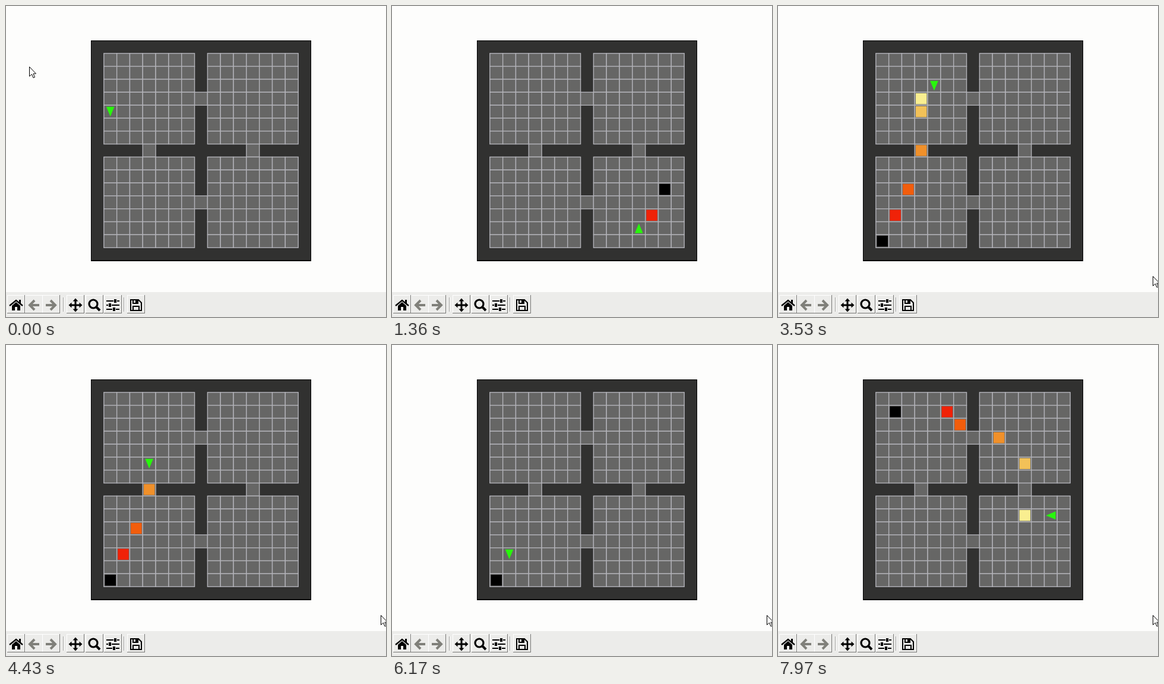
Write an HTML page with a canvas that moves like this. It is 640x524 px and loops after 8000 ms.

```html
<!DOCTYPE html>
<html lang="en">
<head>
<meta charset="utf-8">
<title>Four rooms</title>
<style>
  html, body { margin: 0; width: 100%; height: 100%; overflow: hidden; background: #fdfdfc; }
  canvas { display: block; }
</style>
</head>
<body>
<canvas id="stage" width="640" height="524"></canvas>
<script>
const ctx = document.getElementById('stage').getContext('2d');
const LOOP = 8000;
const TICK = 135, FIRST_TICK = 8;
const PLAN_TICKS = 2, START_TICKS = 5, DOOR_WAIT = 2;
const LEFT = 143, TOP = 58, BOARD = 371, ROOMS = 17, CELL = BOARD / ROOMS;
const PAPER = '#fdfdfc', FACE = '#ececea', INK = '#000';
const SUBGOAL_COLORS = ['#f9ee90', '#f2c158', '#f0902a', '#f25d0c', '#f02208'];

// Headings: 0 east, 1 south, 2 west, 3 north. The last goal is the final one.
const EPISODES = [
  { tick: 0, pose: [1, 5, 1], goals: [] },
  { tick: 1, pose: [9, 15, 0], goals: [[12, 14], [13, 13], [14, 11]] },
  { tick: 18, pose: [5, 1, 3], goals: [[4, 4], [4, 5], [4, 8], [3, 11], [2, 13], [1, 15]] },
  { tick: 52, pose: [15, 10, 1], goals: [[12, 10], [12, 6], [10, 4], [7, 3], [6, 2], [2, 2]] }
];

const onWall = n => n % 8 === 0;
const isDoor = (c, r) => onWall(c) !== onWall(r) && (onWall(c) ? r : c) % 8 === 4 &&
  (onWall(c) ? c : r) === 8;
const isFloor = (c, r) => !onWall(c) && !onWall(r) || isDoor(c, r);

function rect(x, y, w, h, color) {
  ctx.fillStyle = color;
  ctx.fillRect(x, y, w, h);
}

function trace(points) {
  ctx.beginPath();
  points.forEach(([x, y]) => ctx.lineTo(x, y));
}

function polygon(points, fill) {
  trace(points);
  ctx.closePath();
  ctx.fillStyle = fill;
  ctx.fill();
}

function stroke(color, width) {
  ctx.strokeStyle = color;
  ctx.lineWidth = width;
  ctx.stroke();
}

function line(points, color, width) {
  trace(points);
  stroke(color, width);
}

function at(x, y, angle, draw) {
  ctx.save();
  ctx.translate(x, y);
  ctx.rotate(angle);
  draw();
  ctx.restore();
}

function drawRooms() {
  rect(LEFT, TOP, BOARD, BOARD + 1, INK);
  rect(LEFT + 1, TOP + 1, BOARD - 2, BOARD - 2, '#313130');
  ctx.strokeStyle = '#b2b2b8';
  ctx.lineWidth = 1.4;
  for (let r = 0; r < ROOMS; r++) {
    for (let c = 0; c < ROOMS; c++) {
      if (!isFloor(c, r)) continue;
      const x = LEFT + c * CELL, y = TOP + r * CELL;
      rect(x, y, CELL, CELL, '#666665');
      ctx.strokeRect(x, y, CELL, CELL);
    }
  }
}

function homeIcon() {
  line([[-11, 1], [0, -8], [11, 1]], INK, 2.4);
  rect(5, -9, 3, 6, INK);
  polygon([[-7, 1], [0, -5], [7, 1], [7, 9], [-7, 9]], INK);
  rect(-2, 3, 4, 6, FACE);
}

function arrowIcon() {
  line([[1, -8], [-7, 0], [1, 8]], '#80807a', 4);
  line([[-6, 0], [9, 0]], '#80807a', 4);
}

function panIcon() {
  for (let i = 0; i < 4; i++) {
    at(0, 0, i * Math.PI / 2, () => {
      rect(0, -1.5, 8, 3, INK);
      polygon([[6.5, -4.5], [11.5, 0], [6.5, 4.5]], INK);
    });
  }
}

function zoomIcon() {
  ctx.beginPath();
  ctx.arc(-2, -2, 7, 0, Math.PI * 2);
  stroke(INK, 3.2);
  line([[3, 3], [9, 9]], INK, 4);
}

function slidersIcon() {
  [2, -7, 0].forEach((knob, i) => {
    const y = (i - 1) * 7;
    rect(-11, y - 1, 22, 2, INK);
    rect(knob - 1, y - 3, 6, 6, FACE);
    rect(knob, y - 3, 4, 6, INK);
  });
}

function saveIcon() {
  line([[-9, -9], [4, -9], [9, -4], [9, 9], [-9, 9], [-9, -10]], INK, 2);
  ctx.strokeRect(-5, 2, 10, 7);
  ctx.strokeRect(-5, -9, 8, 6);
  rect(-1, -8, 3, 4, INK);
}

function button(x, icon, angle = 0) {
  rect(x - 15, 487, 30, 31, '#777775');
  rect(x - 15, 487, 29, 30, '#fff');
  rect(x - 14, 488, 28, 29, FACE);
  at(x, 504, angle, icon);
}

function drawToolbar() {
  rect(0, 482, 640, 42, FACE);
  button(17, homeIcon);
  button(47, arrowIcon);
  button(76, arrowIcon, Math.PI);
  button(117, panIcon);
  button(149, zoomIcon);
  button(180, slidersIcon);
  button(219, saveIcon);
  for (const x of [97, 199]) {
    rect(x - 1, 491, 1, 24, '#a0a09e');
    rect(x, 491, 1, 24, '#fff');
  }
}

function drawGoal([c, r], color) {
  rect(LEFT + c * CELL + 1.7, TOP + r * CELL + 1.7, CELL - 3.4, CELL - 3.4, color);
}

function drawAgent({ c, r, heading }) {
  at(LEFT + (c + .5) * CELL, TOP + (r + .5) * CELL, heading * Math.PI / 2, () =>
    polygon([[-8.2, -6.8], [8.2, 0], [-8.2, 6.8]], '#28f60c'));
}

// Keep going while it brings the goal nearer, else turn: rows first, then columns.
function chooseHeading(heading, dx, dy) {
  const gain = [dx, dy, -dx, -dy];
  if (gain[heading] > 0) return heading;
  if (dy) return dy > 0 ? 1 : 3;
  return dx < 0 ? 2 : 0;
}

function step(agent, goals) {
  if (isDoor(agent.c, agent.r) && agent.waited < DOOR_WAIT) {
    agent.waited++;
    return;
  }
  const [goalC, goalR] = goals[agent.reached];
  const dx = goalC - agent.c, dy = goalR - agent.r;
  const wanted = chooseHeading(agent.heading, dx, dy);
  if (wanted !== agent.heading) {
    const quarterTurns = (wanted - agent.heading + 4) % 4;
    agent.heading = (agent.heading + (quarterTurns === 3 ? 3 : 1)) % 4;
  } else if (dx || dy) {
    agent.c += [1, 0, -1, 0][wanted];
    agent.r += [0, 1, 0, -1][wanted];
    const arrived = agent.c === goalC && agent.r === goalR;
    if (arrived && agent.reached < goals.length - 1) agent.reached++;
    agent.waited = 0;
  }
}

function drawEpisode(t) {
  const tick = Math.max(0, Math.floor((t - FIRST_TICK) / TICK));
  const { tick: start, pose: [c, r, heading], goals } =
    EPISODES.filter(episode => episode.tick <= tick).pop();
  const agent = { c, r, heading, reached: 0, waited: 0 };
  if (goals.length) {
    for (let i = start + START_TICKS; i <= tick; i++) step(agent, goals);
    const last = goals.length - 1;
    const planned = tick >= start + PLAN_TICKS;
    goals.forEach((goal, i) => {
      if (i === last) drawGoal(goal, INK);
      else if (planned && i >= agent.reached) drawGoal(goal, SUBGOAL_COLORS.at(i - last));
    });
  }
  drawAgent(agent);
}

// The pointer leaves upwards, then comes back along the right edge.
function drawCursor(t) {
  const glide = (from, to, start, end) =>
    from + (to - from) * Math.min(1, Math.max(0, (t - start) / (end - start)));
  const leaving = t < 950;
  if (!leaving && t < 1900) return;
  const x = leaving ? 39 : glide(636, 631, 1900, 2300);
  const y = leaving ? glide(102, 9, 100, 950) : glide(330, 455, 1900, 2300);
  at(Math.round(x) + .5, Math.round(y) + .5, 0, () => {
    polygon([[0, 0], [0, 16], [4, 12.5], [6.5, 18.5], [9, 17.5], [6.5, 11.5], [11, 11.5]], PAPER);
    stroke(INK, 1);
  });
}

function render(now) {
  const t = now % LOOP;
  rect(0, 0, 640, 524, PAPER);
  drawRooms();
  drawToolbar();
  drawEpisode(t);
  drawCursor(t);
}

let began;
function animate(now) {
  began ??= now;
  render(now - began);
  requestAnimationFrame(animate);
}
render(0);
requestAnimationFrame(animate);
</script>
</body>
</html>
```
